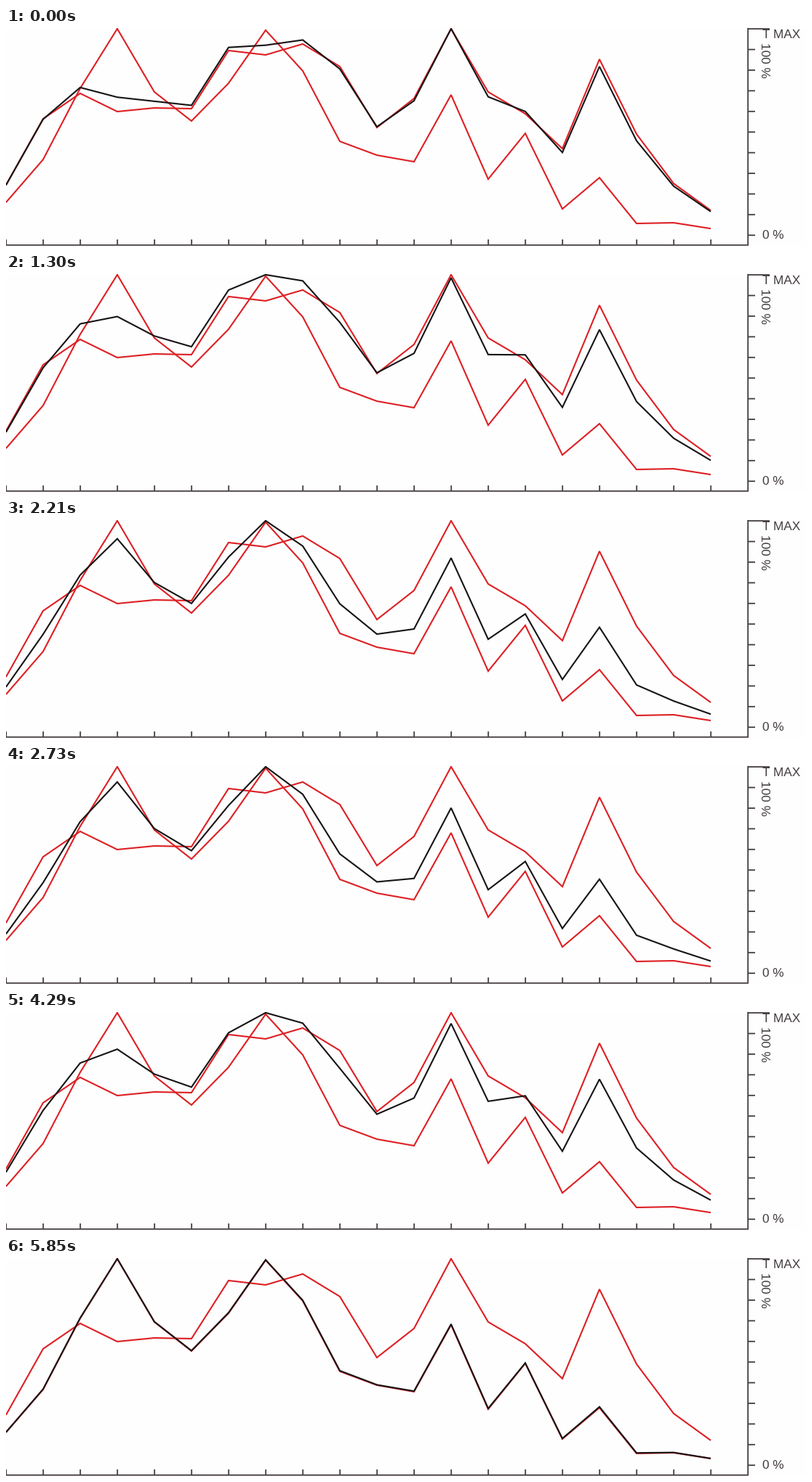
Animation, 1100 px wide and 300 px high, one loop 5.98 s. Source, as a matplotlib script:

```python
import numpy as np
import matplotlib.pyplot as plt
from matplotlib.animation import FuncAnimation

W, H, DPI = 1100, 300, 100
PX = 72 / DPI
FRAMES, STEP = 46, 130
BASE, FULL, GAP = 285, 284, 51     # 0 % line, 100 % height, tick spacing
INK, RED, BLACK = "#433c40", "#dd2024", "#181416"

plt.rcParams["font.family"] = "Liberation Sans"

# The two spectra, as heights above the 0 % line
first = np.array([69, 160, 195, 170, 175, 174, 254, 248, 263, 232,
                  148, 188, 284, 197, 167, 119, 242, 139, 71, 34])
second = np.array([45, 104, 202, 284, 197, 157, 209, 282, 226, 129,
                   110, 101, 193, 77, 140, 36, 79, 16, 17, 9])
x = np.arange(first.size) * GAP


def share(i):
    """Part of the second spectrum: constant-rate sweeps up and down."""
    dip = .0377 * (3 - i)
    rise = .0515 * (i - 3.8)
    fall = .134 * (26.4 - i)
    climb = .0497 * (i - 25)
    return max(0, dip, min(rise, fall), climb)


def blend(mix):
    """Weighted sum of both spectra, scaled so that its peak is 100 %."""
    y = (1 - mix) * first + mix * second
    return y * FULL / y.max()


fig = plt.figure(figsize=(W / DPI, H / DPI), dpi=DPI, facecolor="#fefefe")
ax = fig.add_axes([0, 0, 1, 1])
ax.set(xlim=(0, W), ylim=(H, 0))
ax.axis("off")


def line(xs, ys, color, width, **kw):
    return ax.plot(xs, ys, color=color, lw=width * PX, snap=False,
                   solid_joinstyle="miter", solid_capstyle="butt", **kw)[0]


def label(px, py, text, **kw):
    ax.text(px, py, text, color=INK, fontsize=17.3 * PX, ha="left",
            va="baseline", **kw)


# Axes and ticks
line([0, 1021], [298.7, 298.7], INK, 1.8)
line([1020.2, 1020.2], [0, 299], INK, 1.8)
for tx in x:
    line([tx + .2, tx + .2], [291, 299], INK, 1.8)
for ty in np.linspace(BASE, BASE - FULL, 11):
    line([1020, 1050 if ty < 2 else 1030], [ty + .2, ty + .2], INK, 1.8)

label(1040.5, 14, "T MAX")
label(1040, 290.5, "0 %")
label(1038, 20, "100 %", rotation=-90, rotation_mode="anchor")

for spectrum in (first, second):
    line(x, BASE - spectrum, RED, 2.1)
mixed = line(x, BASE - first, BLACK, 2.1, zorder=5)


def draw(i):
    mixed.set_ydata(BASE - blend(share(i)))
    return mixed,


anim = FuncAnimation(fig, draw, frames=FRAMES, interval=STEP,
                     repeat=True, repeat_delay=0)
plt.show()
```
